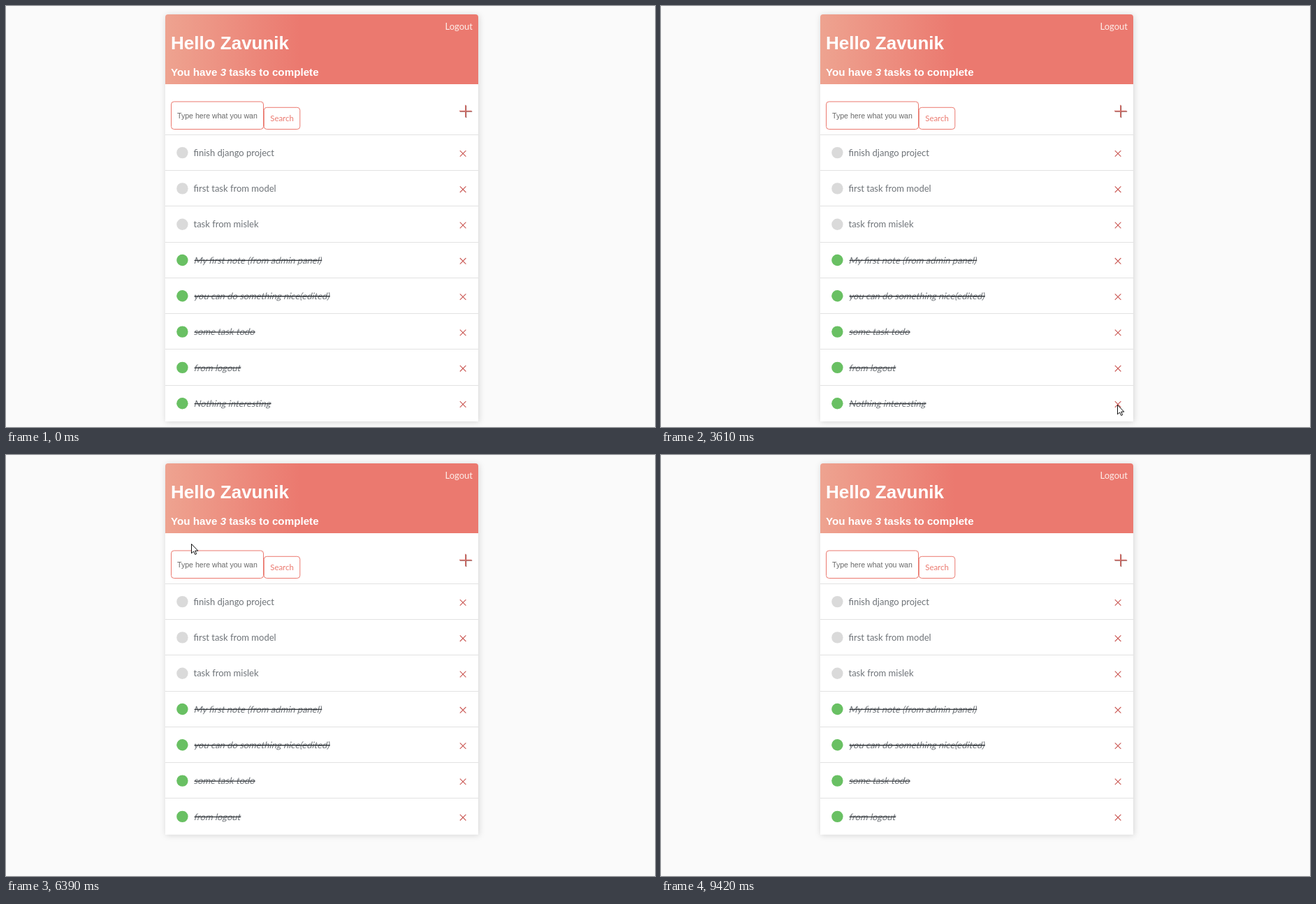
These frames come from a looping animation (929x603 px, 9750 ms). An HTML page:

```html
<!DOCTYPE html>
<html lang="en">
<head>
<meta charset="utf-8">
<title>Task list</title>
<style>
  html, body { margin: 0; height: 100%; overflow: hidden; background: #fafafa; }
  svg { display: block; }
  text { font: 13px Lato, sans-serif; fill: #4b5156; white-space: pre; }
  .head { font: bold 26px "Liberation Sans", Arial, sans-serif; fill: #fff; }
  .sub { font-size: 15.2px; }
  .nav { fill: #fdeeea; }
  .hint { font: 10.6px "Liberation Sans", Arial, sans-serif; fill: #6a6a6a; }
  .btn { font-size: 11.4px; fill: #eb796f; text-anchor: middle; }
  .task tspan { fill: #6e7378; }
  .done { text-decoration: line-through; fill: #33373b; }
  .card { fill: #fff; filter: drop-shadow(1.6px 1.6px 4px rgba(0, 0, 0, .15)); }
  .bar { fill: url(#warm); }
  .box { fill: #fff; stroke: #eb796f; }
  .cross { stroke: #cb5a56; stroke-width: 1.1; }
  .plus { fill: none; stroke-width: 1.3; }
  #cursor path { fill: #fff; stroke: #111; stroke-linejoin: round; }
</style>
</head>
<body>
<svg width="929" height="603">
  <linearGradient id="warm">
    <stop stop-color="#eea390"/>
    <stop offset=".43" stop-color="#eb796f"/>
  </linearGradient>

  <g id="list">
    <path class="card" id="listCard"/>
    <path class="bar" data-bottom="112"/>
    <text class="nav" x="668" y="34" text-anchor="end">Logout</text>
    <text class="head" x="236" y="62">Hello Zavunik</text>
    <text class="head sub" x="236" y="100">You have <tspan font-style="italic">3</tspan> tasks to complete</text>
    <rect class="box" x="236.5" y="137" width="132" height="39.5" rx="4"/>
    <text class="hint" x="245" y="160.5">Type here what you wan</text>
    <rect class="box" x="369.3" y="145.3" width="51.5" height="31.2" rx="4"/>
    <text class="btn" x="395" y="165">Search</text>
    <path class="plus" stroke="#8f4f4c" d="M649.8 151.2h17.4M658.5 142.5v17.4"/>
    <path class="plus" stroke="#d8716a" d="M649 150.4h17.4M657.7 141.7v17.4"/>
    <g id="rows"></g>
  </g>

  <g id="confirm">
    <path class="card" data-bottom="162.5"/>
    <path class="bar" data-bottom="46"/>
    <path fill="none" stroke="#fff" d="M249 30.5H237.5M240.5 27.5l-3 3 3 3"/>
    <text class="nav" x="252" y="33.7">Back</text>
    <text x="244.5" y="88.7">Are you sure you want to delete this task? "Nothing interesting"</text>
    <rect class="box" x="244.5" y="115" width="48.3" height="31.3" rx="4"/>
    <text class="btn" x="268.7" y="134.8">Delete</text>
  </g>

  <g id="cursor">
    <path id="arrow" d="M.5 .5V13.8L3.6 11 5.7 15.5 7.7 14.6 5.7 10.2H9.8Z"/>
    <path id="hand" d="M-1.6 13V1.8a1.5 1.5 0 0 1 3 0V8l5.6 1.3q2 .6 1.8 2.6l-.8 4q-.6 3-3.5 3H1.2q-1.6 0-2.6-1.6l-4-5.6q-.4-1.6 1.2-1.8 1.2 0 2.6 2Z"/>
  </g>
</svg>

<script>
const LOOP = 9750, TOP = 184.6, PITCH = 51.3;
const $ = id => document.getElementById(id);
const show = (id, on) => $(id).style.display = on ? '' : 'none';

// Panel with rounded top corners
const shape = (el, bottom) => el.setAttribute('d', `M228 ${bottom}V16q0-4 4-4H672q4 0 4 4V${bottom}Z`);
document.querySelectorAll('[data-bottom]').forEach(el => shape(el, el.dataset.bottom));

const open = ['finish django project', 'first task from model', 'task from mislek'];
const done = ['My first note (from admin panel)', 'you can do something nice(edited)',
  'some task todo', 'from logout', 'Nothing interesting'];

$('rows').innerHTML = [...open, ...done].map((name, i) => {
  const y = TOP + i * PITCH, ticked = i >= open.length;
  return `<g id="row${i}">
    <path stroke="#e2e2e2" d="M228 ${Math.round(y) - .5}H676"/>
    <circle cx="252.4" cy="${y + 25.5}" r="8.2" fill="${ticked ? '#69c063' : '#dadada'}"/>
    <text class="task ${ticked ? 'done' : ''}" transform="translate(268.5 ${y + 30.2}) skewX(${ticked ? -14 : 0})"><tspan>${name}</tspan></text>
    <path class="cross" d="M649.8 ${y + 22.5}l8.6 8.6m0-8.6l-8.6 8.6"/>
  </g>`;
}).join('');

// Each move runs on from the last one; bow bends its path sideways
const start = { x: 893, y: 592 };
const moves = [
  { from: 260, to: 1010, x: 692, y: 451, bow: -.25 },
  { from: 1800, to: 3210, x: 653, y: 571, bow: .33 },
  { from: 4290, to: 5050, x: 259, y: 123, bow: 0 },
  { from: 5380, to: 5590, x: 265, y: 127, bow: 0 },
  { from: 6720, to: 7130, x: 828, y: 350, bow: 0 },
  { from: 7130, to: 7350, x: 803, y: 401, bow: 0 },
  { from: 7680, to: 8590, x: 376, y: 274, bow: .75 },
  { from: 8720, to: 9420, x: 859, y: 605, bow: -.15 }
];

function pointer(t) {
  const i = Math.max(0, moves.findLastIndex(m => m.from <= t));
  const a = moves[i - 1] || start, b = moves[i];
  const p = Math.min(1, Math.max(0, (t - b.from) / (b.to - b.from)));
  const u = p * p * (3 - 2 * p), side = 2 * u * (1 - u) * b.bow;
  const dx = b.x - a.x, dy = b.y - a.y;
  return [a.x + dx * u + dy * side, a.y + dy * u - dx * side];
}

function draw() {
  const t = performance.now() % LOOP;
  const asking = t >= 3680 && t < 6320, deleted = t >= 6320;
  show('list', !asking);
  show('confirm', asking);
  show('row7', !deleted);
  shape($('listCard'), TOP + PITCH * (deleted ? 7 : 8));

  const [x, y] = pointer(t);
  const hand = asking ? x < 293 && y < 147 : t >= 3100 && t < 3540;
  show('cursor', t >= 260 && t < 9420);
  show('hand', hand);
  show('arrow', !hand);
  $('cursor').setAttribute('transform', `translate(${x} ${y})`);
  requestAnimationFrame(draw);
}
draw();
</script>
</body>
</html>
```
